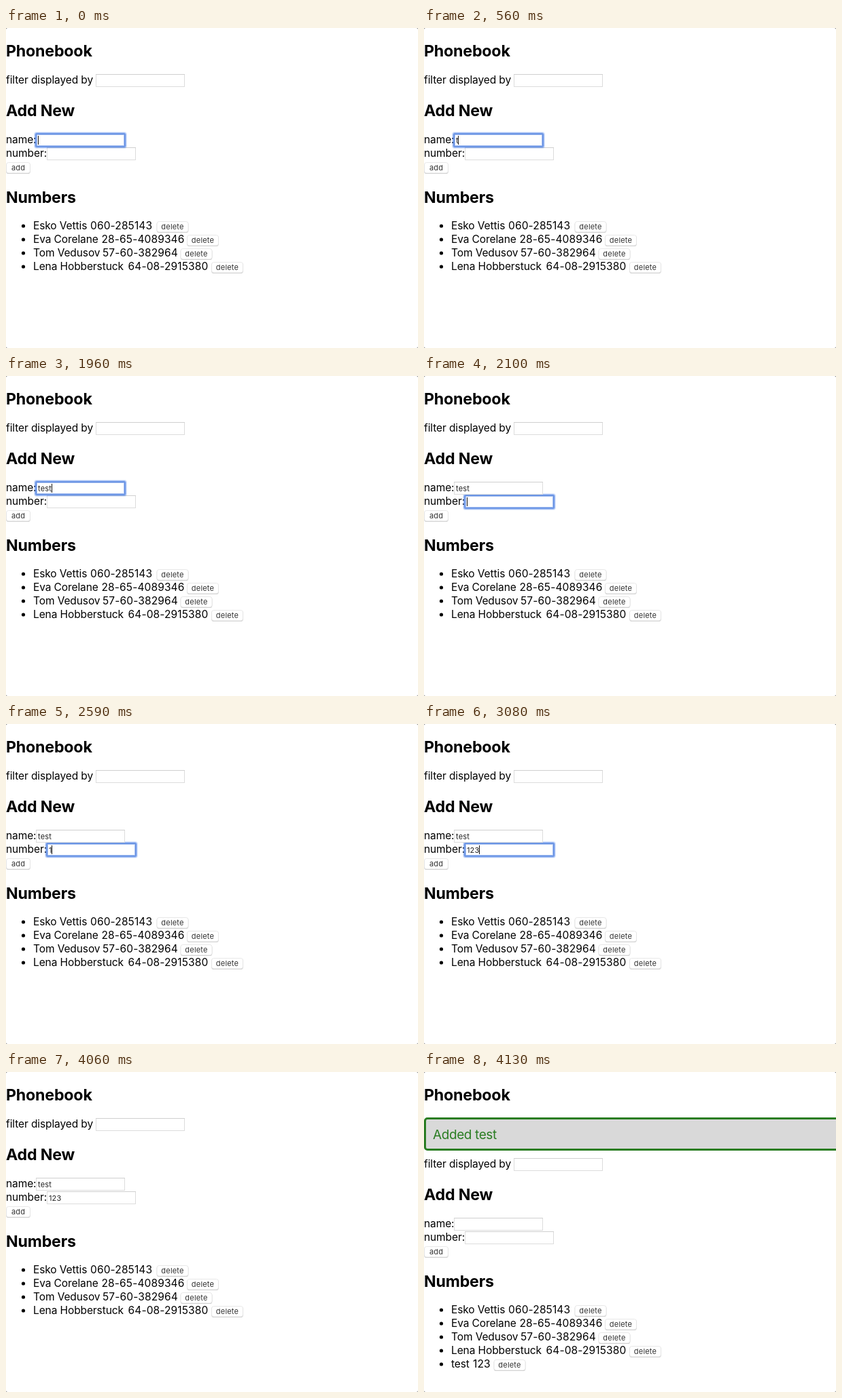
These frames come from a looping animation (606x472 px, 4.41 s). An HTML page:

```html
<!DOCTYPE html>
<html lang="en">
<head>
<meta charset="utf-8">
<title>Phonebook</title>
<style>
  html, body { margin: 0; width: 100%; height: 100%; overflow: hidden; background: #fff; }
  svg { display: block; width: 606px; height: 472px; font-family: Inter, Roboto, sans-serif; }
  text { white-space: pre; }
  .body { font-size: 15.5px; letter-spacing: -.1px; }
  .digits { font-size: 15.5px; letter-spacing: .13px; }
  .head { font-size: 23.2px; font-weight: 700; letter-spacing: -.2px; }
  .small { font-size: 11px; letter-spacing: .15px; fill: #222; }
  .label { font-size: 11px; letter-spacing: .2px; fill: #333; text-anchor: middle; }
  .notice { font-size: 19px; letter-spacing: -.4px; fill: #2a7d22; }
</style>
</head>
<body>
<svg id="stage" viewBox="0 0 606 472">
  <defs>
    <linearGradient id="pressed" x2="0" y2="1">
      <stop stop-color="#5fa9f8"/>
      <stop offset="1" stop-color="#1468e8"/>
    </linearGradient>
  </defs>
</svg>
<script>
const LOOP = 4410;
const stage = document.getElementById('stage');

function el(parent, tag, attrs, content) {
  const node = document.createElementNS('http://www.w3.org/2000/svg', tag);
  for (const key in attrs) node.setAttribute(key, attrs[key]);
  if (content !== undefined) node.textContent = content;
  return parent.appendChild(node);
}

const text = (parent, cls, x, y, str) => el(parent, 'text', { class: cls, x, y }, str);
const show = (node, on) => node.setAttribute('visibility', on ? 'visible' : 'hidden');

function button(parent, x, y, width, str) {
  el(parent, 'rect', { x: x + .2, y: y + .9, width: width - .4, height: 16, rx: 3.5, fill: '#c6c6c6' });
  const face = el(parent, 'rect', {
    x: x + .5, y: y + .5, width: width - 1, height: 15.5, rx: 3.2, fill: '#fff', stroke: '#e2e2e2', 'stroke-width': .8
  });
  const label = text(parent, 'label', x + width / 2, y + 12.3, str);
  return { face, label };
}

function field(parent, x, y) {
  el(parent, 'rect', { x: x + .5, y: y + .5, width: 130, height: 18, fill: '#fff', stroke: '#dcdcdc' });
  el(parent, 'path', { d: `M${x} ${y + .5}h131`, stroke: '#cfcfcf' });
  // Soft focus ring: narrower strokes add up towards the edge
  const ring = el(parent, 'g', { fill: 'none', stroke: '#2f6ce0' });
  const glow = (grow, w, opacity) => el(ring, 'rect', {
    x: x - grow, y: y - grow, width: 131 + 2 * grow, height: 19 + 2 * grow, rx: 1.5,
    'stroke-width': w, 'stroke-opacity': opacity
  });
  glow(.5, 5, .14);
  glow(0, 4, .34);
  glow(0, 2, .4);
  const value = text(parent, 'small', x + 3, y + 14, '');
  const caret = el(parent, 'rect', { y: y + 3, width: 1, height: 13, fill: '#111' });
  return {
    set(str, focused, blink) {
      if (value.textContent !== str) value.textContent = str;
      const len = str ? value.getComputedTextLength() : 0;
      caret.setAttribute('x', Math.round(x + 2.6 + len));
      show(ring, focused);
      show(caret, focused && blink);
    }
  };
}

function entry(parent, y, name, numX, number, buttonX) {
  const row = el(parent, 'g', {});
  el(row, 'circle', { cx: 25.5, cy: y - 5, r: 2.6 });
  text(row, 'body', 40, y, name);
  text(row, 'digits', numX, y, number);
  button(row, buttonX, y - 12, 47, 'delete');
  return row;
}

text(stage, 'head', 0, 42, 'Phonebook');

const notice = el(stage, 'g', {});
el(notice, 'rect', {
  x: 1.5, y: 68.5, width: 640, height: 46, rx: 3.5, fill: '#d9d9d9', stroke: '#2a7d22', 'stroke-width': 3
});
text(notice, 'notice', 13, 99, 'Added test');

const page = el(stage, 'g', {});
text(page, 'body', 0, 82, 'filter displayed by');
field(page, 132, 68).set('', false, false);
text(page, 'head', 0, 130, 'Add New');
text(page, 'body', 0, 170, 'name:');
text(page, 'body', 0, 190, 'number:');
const number = field(page, 60, 176);
const name = field(page, 44, 156);
const add = button(page, 0, 198, 36, 'add');
text(page, 'head', 0, 258, 'Numbers');
entry(page, 297, 'Esko Vettis', 124, '060-285143', 221.5);
entry(page, 317, 'Eva Corelane', 140.5, '28-65-4089346', 266);
entry(page, 337, 'Tom Vedusov', 142, '57-60-382964', 256.5);
entry(page, 357, 'Lena Hobberstuck', 179.5, '64-08-2915380', 302);
const added = entry(page, 377, 'test', 72, '123', 102.5);

// Rounded window corners
for (const [x, y, sx, sy] of [[0, 0, 1, 1], [606, 0, -1, 1], [0, 472, 1, -1], [606, 472, -1, -1]])
  el(stage, 'path', { d: 'M0 0H2.5Q0 0 0 2.5Z', fill: '#777', transform: `translate(${x} ${y}) scale(${sx} ${sy})` });

const typed = (str, times, t) => str.slice(0, times.filter(at => t >= at).length);
const within = (t, from, to) => t >= from && t < to;

function draw(t) {
  const done = t >= 4130;
  const press = within(t, 3920, 4060);
  const nameBlink = !within(t, 420, 560) && !within(t, 1470, 1960);

  name.set(done ? '' : typed('test', [560, 700, 840, 910], t), t < 2100, nameBlink);
  number.set(done ? '' : typed('123', [2590, 2800, 3080], t), within(t, 2100, 3920), t < 3640);

  add.face.setAttribute('fill', press ? 'url(#pressed)' : '#fff');
  add.face.setAttribute('stroke', press ? '#3a83ea' : '#e2e2e2');
  add.label.style.fill = press ? '#fff' : '';

  show(notice, done);
  show(added, done);
  page.setAttribute('transform', `translate(0 ${done ? 59 : 0})`);
}

const start = performance.now();
function tick() {
  draw((performance.now() - start) % LOOP);
  requestAnimationFrame(tick);
}
tick();
</script>
</body>
</html>
```
